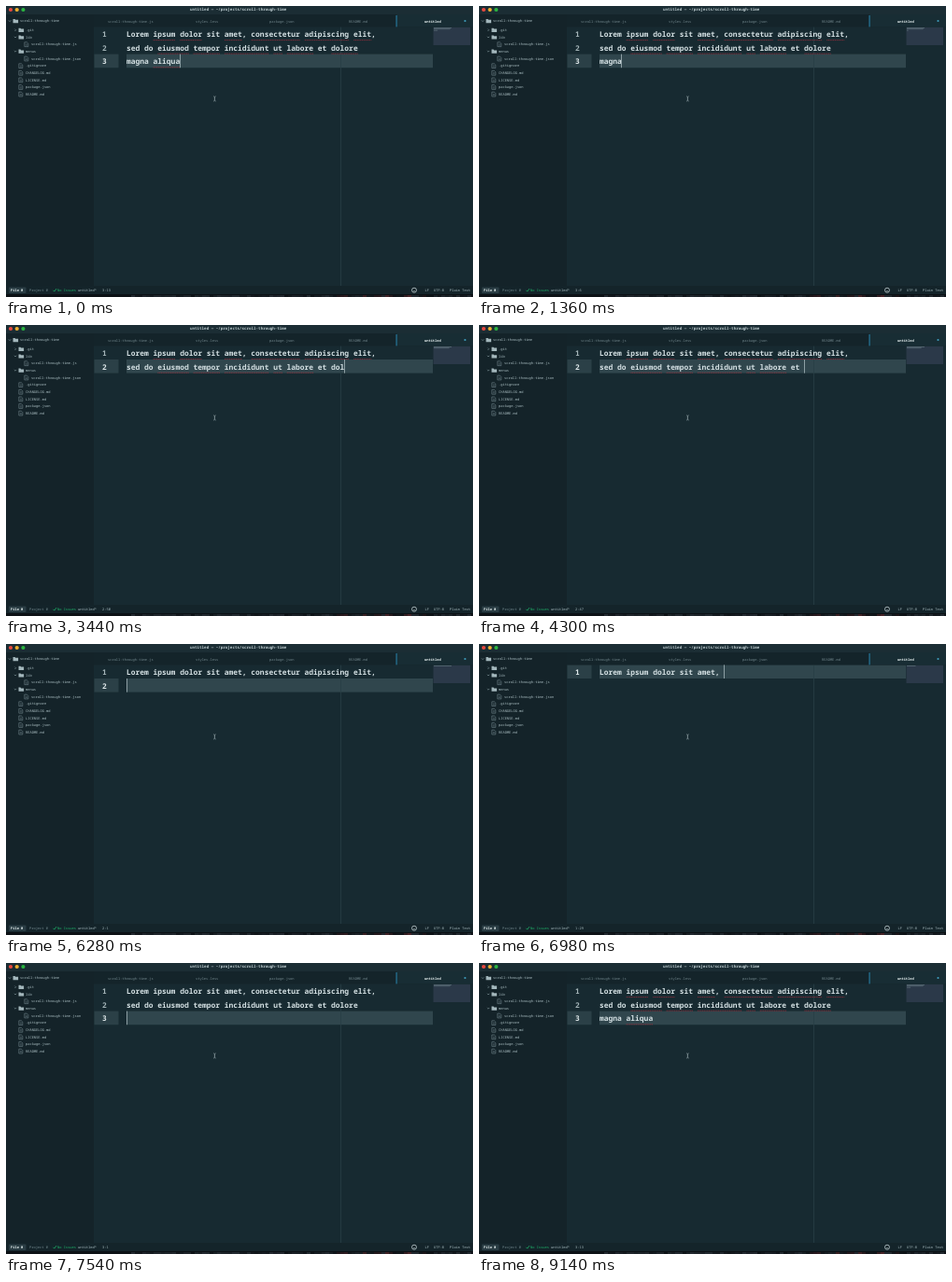
These frames come from a looping animation (500 px wide and 312 px high, 9.22 s). An HTML page:

```html
<!DOCTYPE html>
<html lang="en">
<head>
<meta charset="utf-8">
<title>Scroll through time</title>
<style>
html, body { margin: 0; width: 100%; height: 100%; overflow: hidden; background: #172a31; }
svg { display: block; width: 500px; height: 312px; }
text { font-family: "Noto Sans Mono", "DejaVu Sans Mono", monospace; font-size: 3.7px; font-weight: 500;
  fill: #a9bdc1; white-space: pre; text-rendering: geometricPrecision; }
.code { font-size: 7.95px; font-weight: 600; fill: #d3dfe2; }
.num { font-size: 7.95px; font-weight: 600; fill: #a3b3b7; }
.num.on { font-weight: 700; fill: #dde6e8; }
.title { font-size: 4.22px; font-weight: 600; fill: #b9c8cb; text-anchor: middle; }
.dim { fill: #71868c; }
.lit { fill: #e4eeee; font-weight: 700; }
.ok { fill: #1fb66b; }
</style>
</head>
<body>
<svg id="stage" viewBox="0 0 500 312" xmlns="http://www.w3.org/2000/svg"></svg>
<script>
const stage = document.getElementById("stage");
const LOOP = 9220, LEFT = 129, TOP = 22.4, ROW = 14.6, CHAR = 4.77;
const LINES = [
  "Lorem ipsum dolor sit amet, consectetur adipiscing elit,",
  "sed do eiusmod tempor incididunt ut labore et dolore",
  "magna aliqua"
];
const TEXT = LINES.join("\n");
const KNOWN = ["Lorem", "sit", "sed", "do", "et", "magna"];

// [time, characters left in the buffer]
const HISTORY = [
  [0, 122], [20, 122], [240, 119], [540, 119], [880, 116], [1200, 116],
  [1940, 110], [2379, 110], [2380, 109], [3040, 106], [3440, 106],
  [4300, 103], [4660, 103], [5440, 64], [5719, 64], [5720, 63],
  [6000, 63], [6280, 57], [6640, 28], [6980, 28], [7280, 78],
  [7540, 110], [7840, 122], [LOOP, 122]
];
// Spans without cursor, and without spelling marks
const BLINKS = [[8180, 8580], [8980, LOOP]];
const UNCHECKED = [[6000, 7980]];

function add(tag, attrs, content = "") {
  const el = document.createElementNS("http://www.w3.org/2000/svg", tag);
  for (const key in attrs) el.setAttribute(key, attrs[key]);
  el.textContent = content;
  return stage.appendChild(el);
}
const rect = (x, y, width, height, fill, more) => add("rect", { x, y, width, height, fill, ...more });
const label = (x, y, content, cls = "") => add("text", { x, y, class: cls }, content);
const path = (d, stroke, width = 0.6) =>
  add("path", { d, stroke, "stroke-width": width, fill: "none" });
const dot = (cx, cy, r, fill, more) => add("circle", { cx, cy, r, fill, ...more });
const show = (el, on) => el.setAttribute("visibility", on ? "visible" : "hidden");
const within = (spans, t) => spans.some(([from, to]) => t >= from && t < to);

function drawFrame() {
  rect(0, 0, 500, 9, "#1b2d34");
  rect(0, 9, 94, 291, "#142329");
  ["#e8483f", "#eeb02f", "#2bb540"].forEach((c, i) => dot(5 + i * 6.7, 4, 2.1, c));
  label(248.7, 5.4, "untitled — ~/projects/scroll-through-time", "title");
}

function drawTabs() {
  rect(94, 9, 406, 13.4, "#14242a");
  rect(418, 9, 82, 13.4, "#182d34");
  rect(417.6, 10, 0.9, 12.4, "#2b91bd");
  [[109, "scroll-through-time.js"], [203, "styles.less"], [282, "package.json"], [367, "README.md"]]
    .forEach(([x, name]) => label(x, 17.5, name, "dim"));
  label(448, 17.5, "untitled", "lit");
  dot(491.5, 16, 1.1, "#3f9dbd");
}

function drawTree() {
  const folder = (x, y) =>
    add("path", { d: `M${x} ${y - 2}h2l.6 .8h3v3.4h-5.6z`, fill: "#a3b7bc" });
  const file = (x, y) => {
    path(`M${x} ${y - 2.2}h2.6l1.4 1.4v3.4h-4z`, "#82999f", 0.5);
    path(`M${x + 1} ${y}h2m-2 1.2h2`, "#82999f", 0.4);
  };
  const arrow = (x, y, open) =>
    path(open ? `M${x - 1.2} ${y - 0.6}l1.2 1.2l1.2 -1.2` : `M${x - 0.6} ${y - 1.2}l1.2 1.2l-1.2 1.2`, "#8fa5aa");

  [[15, 16, "scroll-through-time", 1], [21, 25.8, ".git", 0], [21, 33.4, "lib", 1],
   [27, 41, "scroll-through-time.js"], [21, 48.6, "menus", 1], [27, 56.3, "scroll-through-time.json"],
   [21, 64, ".gitignore"], [21, 71.6, "CHANGELOG.md"], [21, 79.2, "LICENSE.md"],
   [21, 86.8, "package.json"], [21, 94.4, "README.md"]
  ].forEach(([x, y, name, open]) => {
    if (open === undefined) file(x - 7.2, y);
    else {
      folder(x - 7.5, y);
      arrow(x - 11, y, open);
    }
    label(x, y + 1.3, name);
  });
}

function drawStatus() {
  rect(0, 300, 500, 9, "#14242a");
  rect(3, 301.5, 18.5, 6.5, "#2a3d44", { rx: 1 });
  label(5, 306, "File 0", "lit");
  label(25, 306, "Project 0", "dim");
  path("M50.5 304.8l1.2 1.3l2.3 -3", "#1fb66b", 0.8);
  label(55, 306, "No Issues", "ok");
  label(77, 306, "untitled*");
  dot(437, 304.7, 2.5, "none", { stroke: "#c2d0d2", "stroke-width": 0.8 });
  path("M435.8 305.3q1.2 1 2.4 0", "#c2d0d2", 0.5);
  label(448.5, 306, "LF");
  label(458, 306, "UTF-8");
  label(475, 306, "Plain Text");

  // Sliver of desktop below the window
  rect(0, 309, 500, 3, "#0c1115");
  let seed = 7;
  const random = () => (seed = seed * 16807 % 2147483647) / 2147483647;
  for (let x = 130; x < 500; x += 4) {
    const red = x > 350 && x < 450 && random() < 0.6;
    rect(x, 310, 4, 2, red ? "#5e2c30" : "#2b333b", { opacity: random() * 0.8 });
  }
}

drawFrame();
const bands = [
  rect(94.5, TOP, 26, ROW, "#2b4047"),
  rect(LEFT, TOP, 328, ROW, "#30464d")
];
rect(358, 22.4, 0.8, 277.6, "#293f47");
rect(457.5, 22.4, 39.5, 19.6, "#2b3949");
drawTabs();
drawTree();
drawStatus();

const rows = LINES.map((line, i) => {
  const base = TOP + i * ROW + 10.5;
  return {
    num: label(103, base, i + 1, "num"),
    code: label(LEFT, base, "", "code"),
    mini: rect(458, 23.2 + i * 1.3, 0, 0.6, "#8da1a6", { opacity: 0.65 })
  };
});

// Spelling marks under every word the dictionary lacks
const marks = [];
LINES.forEach((line, row) => {
  const offset = TEXT.indexOf(line);
  for (const { 0: word, index } of line.matchAll(/\w+/g)) {
    if (KNOWN.includes(word)) continue;
    const el = path(`M${LEFT + index * CHAR} ${TOP + row * ROW + 14.2}h${word.length * CHAR}`, "#a5303e", 0.7);
    el.setAttribute("stroke-dasharray", "1.2 .5");
    marks.push({ el, end: offset + index + word.length });
  }
});

const cursor = rect(LEFT, TOP, 1, ROW, "#8d9fa4");
const place = label(103, 306, "");

// Mouse pointer
path("M222 96.8q1.4 0 1.4 1v3.3q0 1 -1.4 1m2.8 -5.3q-1.4 0 -1.4 1v3.3q0 1 1.4 1", "#8b9da2");

function lengthAt(t) {
  const i = Math.max(1, HISTORY.findIndex(([time]) => time >= t));
  const [t0, n0] = HISTORY[i - 1], [t1, n1] = HISTORY[i];
  return Math.round(n0 + (n1 - n0) * (t - t0) / (t1 - t0));
}

function render(t) {
  const n = lengthAt(t);
  const lines = TEXT.slice(0, n).split("\n");
  const last = lines.length - 1, col = lines[last].length, y = TOP + last * ROW;

  rows.forEach(({ num, code, mini }, i) => {
    show(num, i <= last);
    num.setAttribute("class", i === last ? "num on" : "num");
    code.textContent = lines[i] || "";
    mini.setAttribute("width", (lines[i] || "").length * 0.34);
  });
  [...bands, cursor].forEach(el => el.setAttribute("y", y));
  cursor.setAttribute("x", Math.floor(LEFT + col * CHAR));
  show(cursor, !within(BLINKS, t));
  place.textContent = `${last + 1}:${col + 1}`;

  const checked = !within(UNCHECKED, t);
  marks.forEach(({ el, end }) => show(el, checked && end <= n));
}

const start = performance.now();
function tick() {
  const t = (performance.now() - start) % LOOP;
  render(Math.floor(t / 20) * 20);
  requestAnimationFrame(tick);
}
tick();
</script>
</body>
</html>
```
